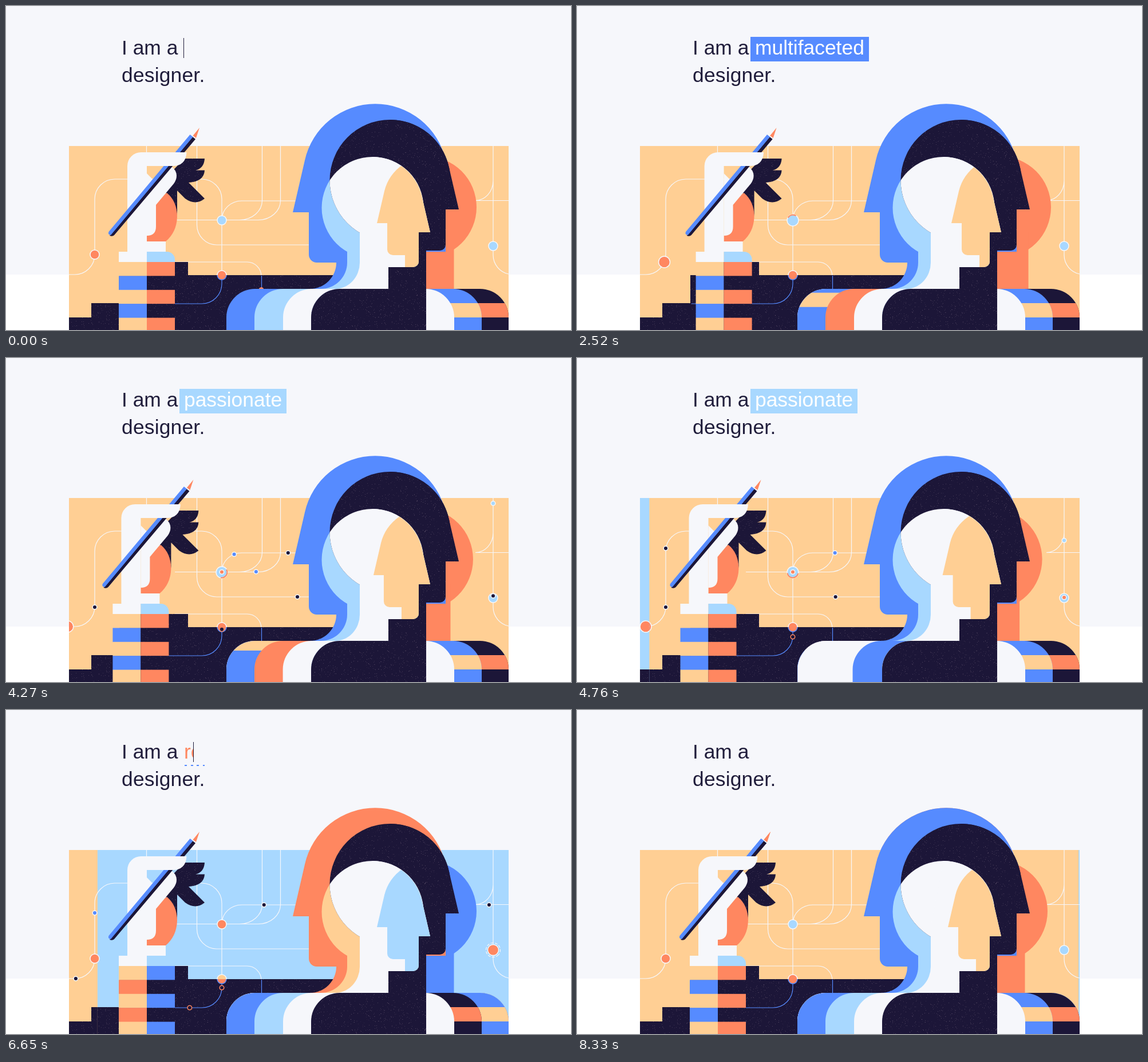
Write an HTML page with a canvas that moves like this. It is 987 px wide and 567 px high and loops after 8.4 s.

```html
<!DOCTYPE html>
<html lang="en">
<head>
<meta charset="utf-8">
<title>I am a designer</title>
<style>
html, body { margin: 0; width: 987px; height: 567px; overflow: hidden; }
body { position: relative; background: linear-gradient(#f6f7fb 470px, #fff 470px); }
canvas { position: absolute; left: 0; top: 0; }
p, #word, #caret, #mark, #dash { position: absolute; margin: 0; }
p, #word { font: 35.4px/48px "Liberation Sans", Arial, sans-serif; color: #201d3b; white-space: pre; }
#word { left: 311px; top: 48.5px; overflow: hidden; }
#caret { top: 56px; width: 1px; height: 35px; background: #201d3b; }
#mark { left: 303px; top: 54px; height: 43px; }
#dash { left: 312px; top: 96px; height: 2px; background: repeating-linear-gradient(90deg, #568bff 0 4px, transparent 4px 10.6px); }
</style>
</head>
<body>
<canvas id="stage" width="987" height="567"></canvas>
<p style="left:202px;top:48.5px">I am a</p>
<p style="left:202px;top:97.3px;letter-spacing:.2px">designer.</p>
<div id="mark"></div>
<div id="word"></div>
<div id="dash"></div>
<div id="caret"></div>
<script>
const LOOP = 8400;
const $ = id => document.getElementById(id);
const ctx = $('stage').getContext('2d');
const BLUE = '#568bff', SKY = '#a8d8ff', ORANGE = '#ff8760', PEACH = '#ffcf94', WHITE = '#f6f7fb', INK = '#1c1638';

// Speckled ink texture
const tile = document.createElement('canvas');
tile.width = tile.height = 256;
const tc = tile.getContext('2d');
let seed = 7;
const rnd = () => (seed = seed * 16807 % 2147483647) / 2147483647;
tc.fillStyle = INK;
tc.fillRect(0, 0, 256, 256);
for (let i = 0; i < 2600; i++) {
  tc.fillStyle = `rgba(205,180,190,${rnd() * .3})`;
  tc.fillRect(rnd() * 256 | 0, rnd() * 256 | 0, 1, 1);
}
const NAVY = ctx.createPattern(tile, 'repeat');

const warm = { bg: PEACH, head: BLUE, neck: SKY, back: ORANGE, node: SKY, low: ORANGE, left: BLUE, right: ORANGE };
const cool = { bg: SKY, head: ORANGE, neck: PEACH, back: BLUE, node: ORANGE, low: PEACH, left: ORANGE, right: BLUE };

const clamp = p => Math.max(0, Math.min(1, p));
const span = (t, a, b) => clamp((t - a) / (b - a));
const sine = p => (1 - Math.cos(Math.PI * p)) / 2;
// Value at t from a flat list of time, value pairs
function key(k, t, ease = p => p) {
  if (t <= k[0]) return k[1];
  for (let i = 2; i < k.length; i += 2)
    if (t < k[i]) return k[i - 1] + (k[i + 1] - k[i - 1]) * ease((t - k[i - 2]) / (k[i] - k[i - 2]));
  return k[k.length - 1];
}

const path = d => new Path2D(d);
function fill(p, color) { ctx.fillStyle = color; ctx.fill(p); }
function rect(x, y, w, h, color) { ctx.fillStyle = color; ctx.fillRect(x, y, w, h); }
function circle(x, y, r, color, edge, width = 1.5) {
  ctx.beginPath();
  ctx.arc(x, y, r, 0, 7);
  ctx.fillStyle = color;
  ctx.fill();
  if (edge) { ctx.strokeStyle = edge; ctx.lineWidth = width; ctx.stroke(); }
}
function arc(x, y, r, a, b, color, width) {
  ctx.beginPath();
  ctx.arc(x, y, r, a, b);
  ctx.strokeStyle = color;
  ctx.lineWidth = width;
  ctx.stroke();
}
function group(dx, clip, draw) {
  ctx.save();
  if (clip) ctx.clip(clip);
  ctx.translate(dx, 0);
  draw();
  ctx.restore();
}

// Circuit lines
const wires = path(`M110 470H120A35 35 0 0 0 155 435V338A35 35 0 0 1 190 303H342A35 35 0 0 1 377 338V471
M245.5 245V260M333.5 245V383A35 35 0 0 0 368 418H540M447.5 245V340A40 34 0 0 1 408 374.5
M479.5 245V340A39 34 0 0 1 440 374.5H295M377 374A35 33 0 0 1 412 341H540
M295 448H421A25 25 0 0 1 446 473M851 245V436A34 34 0 0 0 878 469M878 340.5H820A31 35 0 0 0 851 306`);
const lowWires = path('M377 471V486A35 35 0 0 1 342 521H200M446.5 472V500');
const steps = path('M110 567V545H149V520H198V471H222V448H318V471H640V567Z');

function track(d) {
  const el = document.createElementNS('http://www.w3.org/2000/svg', 'path');
  el.setAttribute('d', d);
  return el;
}
const leftTrack = track('M155 318V435A35 35 0 0 1 120 470H90');
const dots = [];
function travel(d, ...list) {
  const line = d.getPointAtLength ? d : track(d);
  for (const [color, ...keys] of list) dots.push({ line, color, keys });
}
travel(leftTrack,
  [PEACH, 900, 0, 1260, 14, 2300, 117],
  [INK, 3000, 0, 3570, 105, 3900, 118, 5600, 118, 6370, 158, 6650, 170, 6850, 188],
  [INK, 4600, 0, 4760, 15, 5600, 105, 5800, 117],
  [BLUE, 6300, 0, 6650, 37, 7300, 117]);
travel('M479 245V340A39 34 0 0 1 440 374H377',
  [PEACH, 700, 0, 1260, 68, 2200, 190],
  [BLUE, 2800, 0, 3570, 50, 4500, 190]);
travel('M377 374A35 33 0 0 1 412 341H529',
  [INK, 1000, 0, 1260, 33, 2200, 170],
  [INK, 3100, 0, 3570, 58, 4600, 170],
  [BLUE, 3900, 0, 4760, 92, 5600, 121, 6400, 170],
  [INK, 6000, 0, 6650, 92, 7200, 170]);
travel('M529 418H368A35 35 0 0 1 333 383V245', [INK, 4100, 0, 4760, 77, 5500, 345]);
travel('M377 375V486A35 35 0 0 1 342 521H280',
  [INK, 2800, 0, 3570, 81, 4760, 113, 5600, 149, 6650, 187, 6900, 225],
  [INK, 4950, 0, 5600, 81, 6650, 111, 7300, 149, 8100, 225]);
travel('M295 448H421A25 25 0 0 1 446 473V500',
  [ORANGE, 0, 189, 300, 192],
  [INK, 700, 0, 1260, 155, 1500, 191]);
travel('M851 245V420',
  [INK, 600, 0, 1260, 59, 2300, 175],
  [INK, 2900, 0, 3570, 82, 4300, 175],
  [SKY, 4200, 0, 4760, 74, 5300, 175],
  [INK, 5000, 0, 5600, 122, 6100, 175]);
travel('M878 341H818',
  [SKY, 5400, 0, 5600, 15, 6250, 60],
  [INK, 6300, 0, 6650, 34, 7000, 60]);

function circuit(t, c) {
  ctx.lineWidth = 1.2;
  ctx.strokeStyle = WHITE;
  ctx.stroke(wires);
  fill(steps, NAVY);
  ctx.strokeStyle = BLUE;
  ctx.stroke(lowWires);

  // Fixed and travelling nodes
  const at = leftTrack.getPointAtLength(key([2200, 117, 2730, 139, 3570, 186, 4200, 186, 4760, 172, 5600, 122, 5900, 117], t));
  circle(at.x, at.y, key([2200, 8, 2500, 10, 5700, 10, 6000, 8], t), ORANGE, WHITE);
  const r = key([2000, 8, 2400, 10, 5000, 10, 5300, 8], t);
  circle(377, 375, r, c.node, WHITE);
  if (t > 1200 && t < 5100) {
    const a = key([1260, -3.9, 3570, -1.6, 4760, .2], t);
    arc(377, 375, r - .5, a, a + key([1260, 1.8, 3570, 1.6, 4760, 2.8], t), ORANGE, 2);
    if (t > 3400) circle(377, key([3570, 378, 4200, 374.5], t), 3.8, ORANGE, WHITE);
  }
  circle(377, 471, 8, ORANGE);
  ctx.beginPath();
  ctx.arc(377, 471, 8, Math.PI, 0);
  ctx.fillStyle = c.low;
  ctx.fill();
  arc(377, 471, 8, Math.PI, 0, WHITE, 1.5);
  arc(377, 471, 8, 0, Math.PI, BLUE, 1.5);
  circle(851, 420, 8, c.node, WHITE);
  if (t > 4500 && t < 5200) circle(851, 419, 3.8, ORANGE, WHITE);
  if (t > 6300 && t < 7200) {
    circle(851, 420, 9.5, c.node, WHITE);
    ctx.setLineDash([5, 2.5]);
    arc(851, 420, 12.5, t / 500, t / 500 + 6.28, WHITE, 1.2);
    ctx.setLineDash([]);
  }
  for (const { line, color, keys } of dots) {
    if (t < keys[0] || t > keys[keys.length - 2]) continue;
    const p = line.getPointAtLength(key(keys, t));
    circle(p.x, p.y, 3.8, color, p.y > 472 && p.x > 200 ? ORANGE : WHITE);
  }
}

const headBack = path('M501 361L522 270A126 126 0 0 1 768 270V430H640V495H531A46 46 0 0 0 577 449H543A14 14 0 0 1 529 435V361Z');
const neckBack = path('M596 400V449A46 46 0 0 1 550 495H668V400Z');
const neckFront = path('M618 390V449A43 46 0 0 1 575 495H668V390Z');
const hair = path('M671 199A106 106 0 0 1 774 283L791 356H768V418A10 10 0 0 1 758 428H734V567H660V400Z');
const hairRound = path('M565.5 305A105.5 106 0 0 1 776.5 305A105.5 106 0 0 1 565.5 305');
const front = path('M640 264A89 89 0 0 1 726 331L741 396H721V447A10 10 0 0 1 711 457H668V495H618V380Z');
const face = path('M648 380L661 324Q668 295 694 277L770 240V457H697V436H676A10 10 0 0 1 666 426V380Z');

function heads(dx, c) {
  circle(733 + dx, 352, 89, c.back);
  rect(730, 395, 52.5 + dx, 100, c.back);
  fill(headBack, c.head);
  circle(640.5, 353, 89, c.neck);
  fill(neckBack, c.neck);
  fill(hairRound, NAVY);
  fill(hair, NAVY);
  group(0, hairRound, () => circle(640.5, 353, 89, WHITE));
  fill(neckFront, WHITE);
  fill(front, WHITE);
  group(0, front, () => { ctx.translate(dx, 0); fill(face, c.bg); });
}

const fingers = path('M299 280L311 267H347Q346 284 331 287.5H347Q346 307 319 309L347 337Q331 350 313 337L299 323V368Q297 342 279 327L262 347L280 300Z');
const cheek = path('M246 402L262 340L281 327Q299 342 299 369Q298 396 279 412H246Z');
const palm = path('M246 293L258 305L285 281H289Q298 288 298 297Q298 304 293 311L262 348V386Q262 402 246 402Z');
const arm = path('M246 256H236A24 24 0 0 0 212 280V430H197V448H246V430H279V412H246Z');
const finger = path('M236 256H315.5Q314 280 291 280H236Z');
const cuff = path('M246 430H281A14 14 0 0 1 295 444V448H246Z');
const tip = path('M338 213L326.5 227L332 231Z');
const pencilInk = path('M326 229L331 233L189 401Q186 404 181 402Z');
const pencilBlue = path('M321.5 225L326.5 229L183 401Q177 400 179.5 395Z');

function hand(c) {
  fill(fingers, NAVY);
  fill(cheek, ORANGE);
  fill(arm, WHITE);
  fill(palm, WHITE);
  fill(tip, ORANGE);
  fill(pencilInk, INK);
  fill(pencilBlue, BLUE);
  fill(finger, WHITE);
  fill(cuff, SKY);
  for (let i = 0; i < 5; i++) {
    const y = 448 + i * 24.4;
    rect(197, y, 49, 24.8, i % 2 ? c.left : PEACH);
    rect(246, y, 49, 24.8, i % 2 ? NAVY : c.right);
  }
}

function scene(t, c, edge) {
  const dx = key([0, 0, 150, 0, 600, -12, 1050, 0, 1300, 0, 1950, -14, 2800, 18.5, 3650, 18.5, 4500, -16.5,
    4780, -16.5, 5450, 0, 7000, 0, 7500, -15, 8150, 0], t, sine);
  const view = new Path2D();
  view.rect(110, 0, edge, 567);
  group(0, view, () => {
    rect(110, 245, 768, 322, c.bg);
    circuit(t, c);
    heads(dx * .57, c);
    group(dx, null, () => hand(c));
  });
}

// Shoulder layers: side, colour, band colour, edge position over time
const L = 1, R = -1;
const layers = [
  [L, BLUE, 0, [0, 385]],
  [L, SKY, 0, [0, 434]],
  [L, WHITE, 0, [100, 484, 600, 385]],
  [L, BLUE, PEACH, [300, 533, 900, 385]],
  [L, ORANGE, 0, [450, 533, 1050, 434]],
  [L, WHITE, 0, [600, 533, 1150, 484, 4250, 484, 4780, 385]],
  [L, BLUE, 0, [4480, 533, 5180, 385]],
  [L, SKY, 0, [5000, 533, 5560, 434]],
  [L, WHITE, 0, [5150, 533, 5750, 484]],
  [R, INK, ORANGE, [0, 878]],
  [R, BLUE, PEACH, [0, 831]],
  [R, WHITE, 0, [5200, 783, 5700, 878]],
  [R, BLUE, PEACH, [5750, 734, 6250, 878]],
  [R, INK, ORANGE, [5900, 734, 6300, 831]],
  [R, WHITE, 0, [6000, 734, 6350, 783, 7350, 783, 7750, 878]],
  [R, INK, ORANGE, [7700, 734, 8000, 878]],
  [R, BLUE, PEACH, [7800, 734, 8100, 831]],
  [R, WHITE, 0, [7900, 734, 8190, 783]]
];
const chest = path('M533 567V545A50 50 0 0 1 583 495H734V567Z');

function shoulders(t) {
  for (const [side, color, band, keys] of layers) {
    const x = key(keys, t, sine);
    const shape = path(`M${x} 567V545A50 50 0 0 ${side === L ? 1 : 0} ${x + side * 50} 495H${side === L ? 640 : 680}V567Z`);
    fill(shape, color);
    if (band) group(0, shape, () => rect(380, side === L ? key([1260, 519.5, 3570, 487], t) : 520, 500, 25, band));
  }
  fill(chest, NAVY);
}

// Word, colour, typing start and end, highlight start and end
const words = [
  ['multifaceted', BLUE, 500, 1700, 1750, 2870],
  ['passionate', '#9cd3ff', 3000, 4084, 4130, 5150],
  ['resourceful', ORANGE, 5240, 6008],
  ['thoughtful', BLUE, 6760, 7180, 7250, 8260]
];
const typed = t => span(t, 5240, 6008) - span(t, 6150, 6704);
let shown = '', full = 0;

function type(t) {
  const [text, color, a, b, on, off] = words.filter(w => t >= w[2]).pop() || words[0];
  if (text !== shown) {
    $('word').style.width = 'auto';
    $('word').textContent = shown = text;
    full = $('word').getBoundingClientRect().width;
  }
  const lit = t >= on && t < off;
  const part = on ? (t < off ? span(t, a, b) : 0) : typed(t);
  $('word').style.width = full * part + 'px';
  $('word').style.color = lit ? '#fff' : color;
  $('mark').style.background = color === BLUE ? BLUE : SKY;
  $('mark').style.width = lit ? (full + 16) * span(t, on - 20, on + 130) + 'px' : 0;
  $('caret').style.left = 310 + full * part + 'px';
  $('caret').hidden = lit || (t >= off && t < off + 140);
  $('dash').style.width = on ? 0 : full * typed(t - (t < 6100 ? 105 : 57)) + 'px';
}

function frame(now) {
  const t = now % LOOP;
  ctx.clearRect(0, 0, 987, 567);
  const cold = 768 * sine(span(t, 4650, 5840));
  const back = 768 * sine(span(t, 6380, 8400) ** .9);
  scene(t, t < 5840 ? warm : cool, 768);
  if (t > 4650 && t < 5840) scene(t, cool, cold);
  if (t > 6380) scene(t, warm, back);
  shoulders(t);
  type(t);
  requestAnimationFrame(frame);
}
requestAnimationFrame(frame);
</script>
</body>
</html>
```
